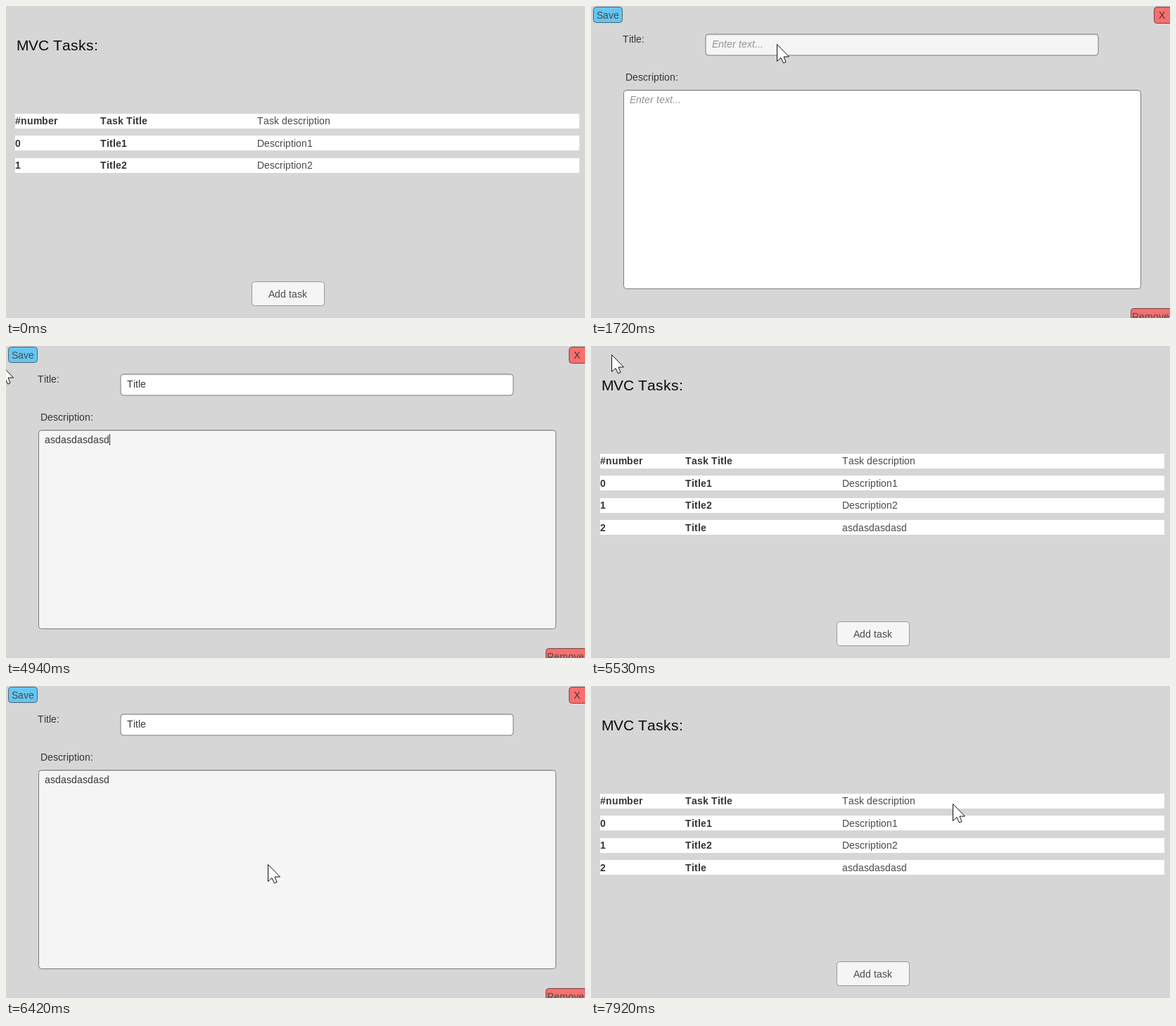
Recreate the animation shown at these times as an HTML page with a canvas. Size 823 px wide and 443 px high, loop 8000 ms.

```html
<!DOCTYPE html>
<html lang="en">
<head>
<meta charset="utf-8">
<title>MVC Tasks</title>
<style>
html, body { margin: 0; width: 100%; height: 100%; overflow: hidden; background: #d6d6d6; }
canvas { display: block; }
</style>
</head>
<body>
<canvas width="823" height="443"></canvas>
<script>
const ctx = document.querySelector('canvas').getContext('2d');
const LOOP = 8000, PRESS = 100, GLIDE = 700;
const FONT = '"Liberation Sans", Arial, sans-serif';
const INK = '#353535', SOFT = '#4a4a4a', HINT = '#939393', GREY = '#f5f5f5';
const BLUE = '#65c6f3', RED = '#f86f6f';
const TITLE = 'Title', DESCRIPTION = 'asdasdasdasd';

// Times at which the list and the form swap
const swaps = [820, 5530, 6420, 7620];

// Places the pointer reaches: time, x, y
const stops = [
  [70, 716, 430], [520, 428, 418], [1620, 265, 54], [3220, 265, 58], [3720, 271, 142], [4740, 53, 79],
  [4920, -6, 27], [5500, 28, 10], [5930, 373, 253], [7520, 807, 10], [7920, 515, 167]
];
const arrow = new Path2D('M0 0V24L5.5 19L9 26.5L12.5 25L9.5 17.5H17Z');

const clamp = (v, lo, hi) => Math.min(hi, Math.max(lo, v));
const during = (t, from, to) => t >= from && t < to;
const smooth = k => k * k * (3 - 2 * k);
const typed = (str, count) => str.slice(0, clamp(count, 0, str.length));

// Glyph advances are rounded to whole pixels
function text(str, x, y, color = INK, style = '', size = 14) {
  ctx.font = `${style} ${size}px ${FONT}`;
  ctx.fillStyle = color;
  for (const ch of str) {
    ctx.fillText(ch, x, y);
    x += Math.round(ctx.measureText(ch).width);
  }
  return x;
}

function rect(x, y, w, h, color) {
  ctx.fillStyle = color;
  ctx.fillRect(x, y, w, h);
}

function box(x, y, w, h, fill, stroke, pressed) {
  ctx.beginPath();
  ctx.roundRect(x + .5, y + .5, w - 1, h - 1, 4);
  ctx.fillStyle = fill;
  ctx.fill();
  ctx.strokeStyle = stroke;
  ctx.stroke();
  if (!pressed) return;
  ctx.fillStyle = 'rgba(0,0,0,.2)';
  ctx.fill();
}

function field(x, y, w, h, active, value, caret) {
  box(x, y, w, h, active ? GREY : '#fff', '#7c7c7c');
  rect(x + 3, y + 1, w - 6, 1, 'rgba(0,0,0,.13)');
  const left = Math.floor(x + 9.5), base = Math.floor(y + 19.5);
  const end = value ? text(value, left, base) : left;
  if (!value) text('Enter text...', left, base, HINT, 'italic');
  if (caret) rect(end, base - 13, 1, 16, INK);
}

function drawList(phase, pressed) {
  text('MVC Tasks:', 15, 63, '#0a0a0a', '', 21);
  const rows = [['#number', 'Task Title', 'Task description'],
    ['0', 'Title1', 'Description1'], ['1', 'Title2', 'Description2']];
  if (phase) rows.push(['2', TITLE, DESCRIPTION]);
  rows.forEach(([number, title, description], i) => {
    const y = 153 + i * 31.5, base = Math.round(y + 15);
    rect(13, Math.floor(y), 802, 21, i === 3 && phase === 2 && pressed ? '#c8c8c8' : '#fff');
    text(number, 13, base, INK, 'bold');
    text(title, 134, base, INK, 'bold');
    text(description, 357, base, SOFT);
  });
  box(349, 391, 104, 35, GREY, '#989898', phase === 0 && pressed);
  text('Add task', 373, 414, SOFT);
}

function drawForm(t, phase, pressed) {
  box(3, 1, 42, 23, BLUE, '#486471', phase === 1 && pressed);
  text('Save', 8, 18, SOFT);
  box(800, 1, 30, 24, RED, '#754545', phase === 3 && pressed);
  text('X', 807, 18, '#453434');
  box(767, 429, 62, 24, RED, '#754545');
  text('Remove', 769, 446, SOFT);

  const first = phase === 1;
  const title = first ? typed(TITLE, Math.floor((t - 2120) / 100)) : TITLE;
  const description = first ? typed(DESCRIPTION, 2 * Math.floor((t - 3920) / 100)) : DESCRIPTION;
  text('Title:', 45, 52);
  field(162.5, 39.5, 559, 31, during(t, 1620, 4940), title, during(t, 2120, 3220));
  text('Description:', 49, 106);
  field(46, 119, 736, 283, t >= 4940, description, during(t, 3720, 5140));
}

function drawPointer(t) {
  if (t < stops[0][0]) return;
  // The pointer is refreshed ten times a second
  const tick = Math.floor((t - 20) / 100) * 100 + 20;
  const i = clamp(stops.findIndex(s => s[0] >= tick), 1, stops.length - 1);
  const [t0, x0, y0] = stops[i - 1], [t1, x1, y1] = stops[i];
  const start = Math.max(t0, t1 - GLIDE);
  const k = smooth(clamp((tick - start) / (t1 - start), 0, 1));
  ctx.save();
  ctx.translate(Math.round(x0 + (x1 - x0) * k) - .5, Math.round(y0 + (y1 - y0) * k) + .5);
  ctx.fillStyle = '#fff';
  ctx.fill(arrow);
  ctx.strokeStyle = '#111';
  ctx.stroke(arrow);
  ctx.restore();
}

function frame(now) {
  const t = now % LOOP;
  const phase = swaps.filter(s => t >= s).length;
  const pressed = t >= swaps[phase] - PRESS;
  rect(0, 0, 823, 443, '#d6d6d6');
  rect(0, 442, 823, 1, '#cfcfcf');
  if (phase % 2) drawForm(t, phase, pressed);
  else drawList(phase, pressed);
  drawPointer(t);
  requestAnimationFrame(frame);
}
frame(performance.now());
</script>
</body>
</html>
```
